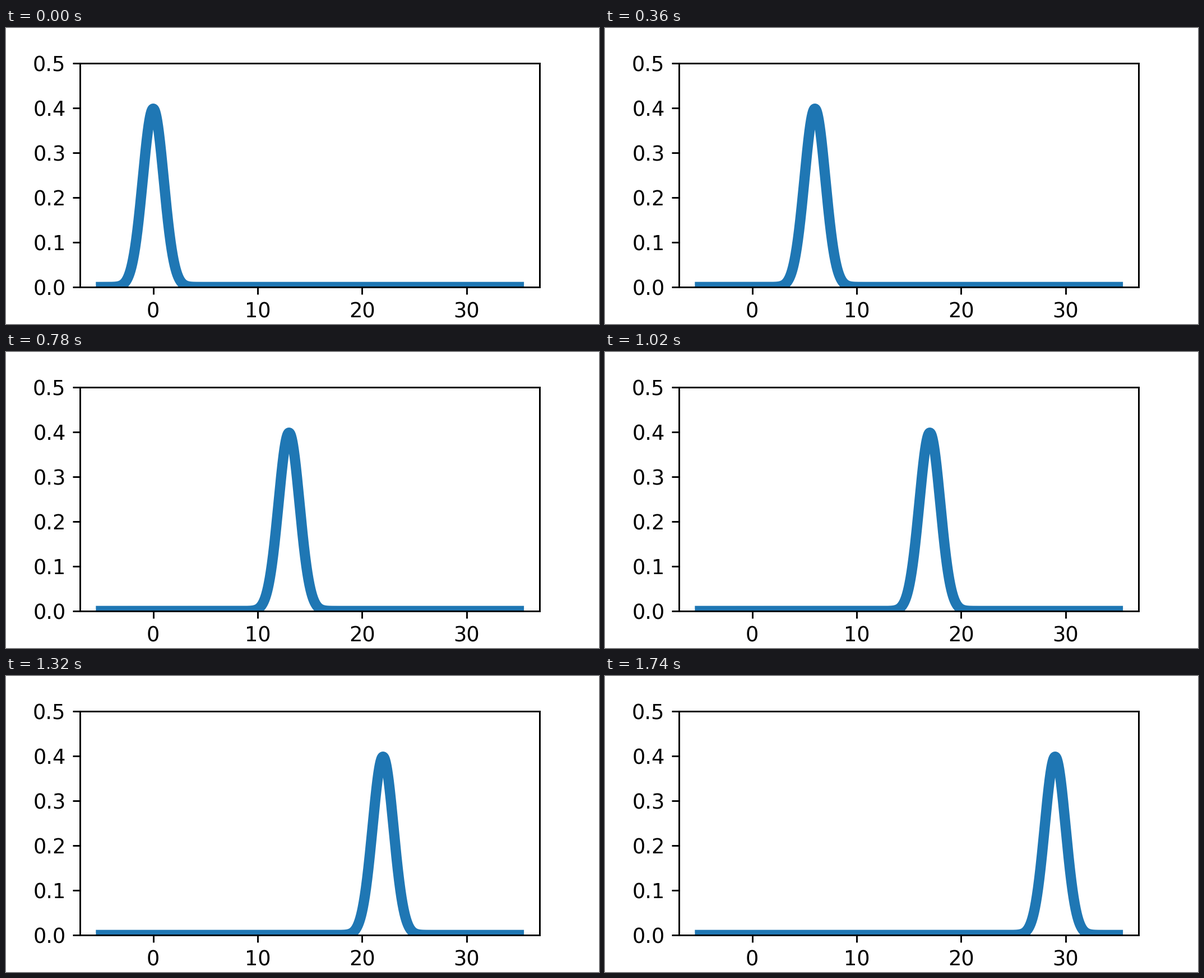
Recreate the animation shown at these times as a matplotlib script. Size 1058 px wide and 529 px high, loop 1.8 s.

```python
import numpy as np
import matplotlib.pyplot as plt
from matplotlib.animation import FuncAnimation

FRAMES = 30
INTERVAL = 60  # ms

plt.rcParams["font.family"] = "DejaVu Sans"

x = np.linspace(-5, 35, 2001)


def normal_pdf(mean):
    return np.exp(-0.5 * (x - mean) ** 2) / np.sqrt(2 * np.pi)


fig, ax = plt.subplots(figsize=(4, 2), dpi=264.5)
fig.subplots_adjust(left=0.125, right=0.9, bottom=0.125, top=0.88)
ax.set_xlim(-7, 37)
ax.set_ylim(0, 0.5)
ax.set_xticks(range(0, 31, 10))
ax.set_yticks(np.linspace(0, 0.5, 6))

curve, = ax.plot(x, normal_pdf(0), color="#1f77b4", lw=5)


def update(frame):
    """Slide the bell one unit to the right per frame."""
    curve.set_ydata(normal_pdf(frame))
    return curve,


anim = FuncAnimation(fig, update, frames=FRAMES, interval=INTERVAL,
                     repeat=True, repeat_delay=0)

plt.show()
```
